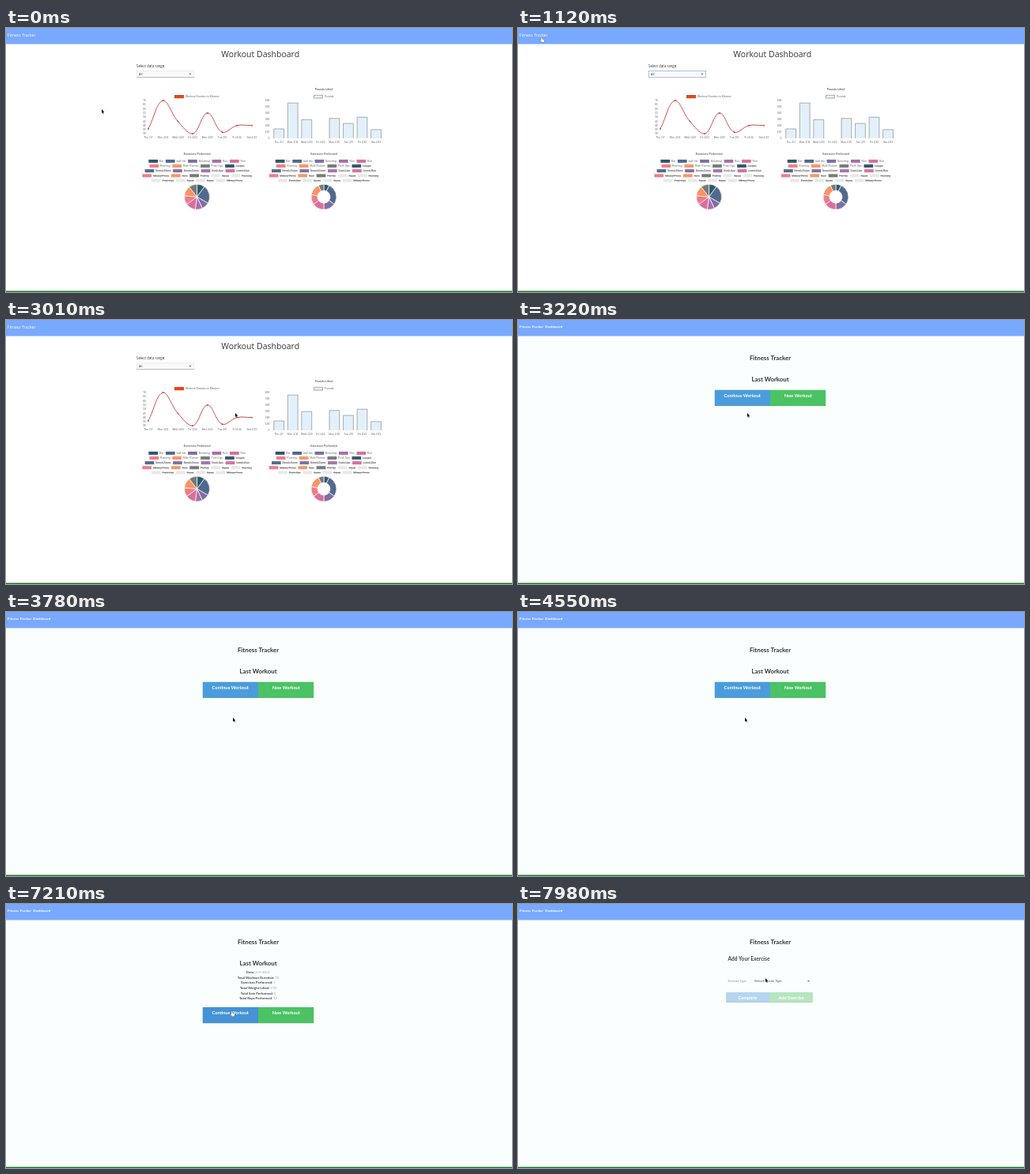
An HTML page with a canvas for the animation above (8000 ms loop, 640 px wide and 335 px high).

```html
<!DOCTYPE html>
<html lang="en">
<head>
<meta charset="utf-8">
<title>Fitness Tracker</title>
<style>
html, body { margin: 0; width: 100%; height: 100%; overflow: hidden; background: #fff; }
canvas { display: block; width: 640px; height: 335px; }
</style>
</head>
<body>
<canvas id="stage" width="640" height="335"></canvas>
<script>
const LOOP = 8000;
const ctx = document.getElementById('stage').getContext('2d');
const OPEN = '"Open Sans", sans-serif';
const LATO = 'Lato, sans-serif';
const ARIAL = '"Liberation Sans", sans-serif';
const GREY = '#666';
const PALETTE = ['#2f5870', '#52698f', '#7f6fa3', '#ab6faa', '#d96f9b', '#f27b85', '#fa9562', '#757b7c'];
const PALE = '#e8e8e8';
const DAYS = ['Thu 1/7', 'Mon 1/11', 'Wed 1/20', 'Fri 1/22', 'Mon 1/25', 'Tue 2/9', 'Fri 2/12', 'Sat 2/13'];

// Exercise names by legend row; "-" marks a hidden (struck out) entry.
const LEGEND = [
  ['Bar', 'wall sits', 'Benching', 'Run', 'Run'],
  ['Running', 'Mule Runner', 'Push Ups', '-Lunges'],
  ['-Bench Press', '-Bench Press', '-Push Ups', '-Lunch Run'],
  ['-Military Press', '-Sum', '-Pull Up', '-Squat', '-Running'],
  ['-Push-Ups', '-Squat', '-Squat', '-Military Press']
];

const STATS = [
  ['Date', '2/9/2021'],
  ['Total Workout Duration', '70'],
  ['Exercises Performed', '1'],
  ['Total Weight Lifted', '170'],
  ['Total Sets Performed', '5'],
  ['Total Reps Performed', '12']
];

// Pointer path: time, x, y of the tip
const PATH = [
  [0, 121, 103], [140, 121, 103], [770, 33, 14], [1120, 29, 12], [1540, 29, 12],
  [2590, 280, 115], [3010, 290, 118], [3640, 290, 118], [3780, 287, 134],
  [5250, 287, 134], [6020, 281, 146], [6230, 280, 145], [6440, 270, 141],
  [6790, 300, 140], [7000, 300, 139], [7420, 270, 134], [7630, 270, 134],
  [7700, 271, 112], [7840, 271, 112], [7980, 313, 94], [8000, 313, 94]
];

function rect(x, y, w, h, color) {
  ctx.fillStyle = color;
  ctx.fillRect(x, y, w, h);
}

function text(str, x, y, size, family, color, align = 'left', weight = 400) {
  ctx.font = `${weight} ${size}px ${family}`;
  ctx.textAlign = align;
  ctx.fillStyle = color;
  ctx.fillText(str, x, y);
}

function label(str, x, y, align = 'center', weight = 400) {
  text(str, x, y + 1.2, 3.4, ARIAL, GREY, align, weight);
}

function frame(bg) {
  rect(0, 0, 640, 335, bg);
  rect(0, 0, 640, 20.4, '#78a9ff');
  rect(0, 333.6, 640, 1.4, '#187a1c');
}

function caret(x, y, color) {
  ctx.fillStyle = color;
  ctx.beginPath();
  ctx.moveTo(x - 1.6, y - 0.8);
  ctx.lineTo(x + 1.6, y - 0.8);
  ctx.lineTo(x, y + 1);
  ctx.fill();
}

// Control points around b for a smooth line through a, b, c
function handles(a, b, c) {
  const d1 = Math.hypot(b[0] - a[0], b[1] - a[1]);
  const d2 = Math.hypot(c[0] - b[0], c[1] - b[1]);
  const k = 0.4 / (d1 + d2 || 1);
  const cap = y => Math.max(92, Math.min(134.3, y));
  const dx = c[0] - a[0], dy = c[1] - a[1];
  return [
    [b[0] - k * d1 * dx, cap(b[1] - k * d1 * dy)],
    [b[0] + k * d2 * dx, cap(b[1] + k * d2 * dy)]
  ];
}

function lineChart() {
  rect(213, 85, 12, 4.2, '#c4472e');
  rect(213.5, 85.5, 11, 3.2, '#f2450f');
  label('Workout Duration in Minutes', 227, 87, 'left');
  for (let i = 0; i < 9; i++) label(70 - 5 * i, 177, 92 + i * 5.28, 'right');

  const pts = [36, 70, 45, 30, 55, 32, 40, 40].map((v, i) => [180 + i * 18.7, 134.3 - (v - 30) * 1.057]);
  const ctl = pts.map((p, i) => handles(pts[i - 1] || p, p, pts[i + 1] || p));
  ctx.strokeStyle = '#c4504c';
  ctx.lineWidth = 1;
  ctx.beginPath();
  ctx.moveTo(...pts[0]);
  for (let i = 1; i < 8; i++) ctx.bezierCurveTo(...ctl[i - 1][1], ...ctl[i][0], ...pts[i]);
  ctx.stroke();
  pts.forEach(([x, y], i) => {
    ctx.fillStyle = '#c4504c';
    ctx.beginPath();
    ctx.arc(x, y, 1, 0, 7);
    ctx.fill();
    label(DAYS[i], x, 139);
  });
}

function barChart() {
  const bar = (x, y, w, h) => {
    rect(x, y, w, h, '#e3f0f9');
    ctx.beginPath();
    ctx.moveTo(x, y + h);
    ctx.lineTo(x, y);
    ctx.lineTo(x + w, y);
    ctx.lineTo(x + w, y + h);
    ctx.strokeStyle = '#858f97';
    ctx.lineWidth = 0.7;
    ctx.stroke();
  };
  label('Pounds Lifted', 402, 77.5, 'center', 700);
  bar(389.5, 85.3, 11, 3.7);
  rect(389.2, 88.7, 11.6, 0.7, '#858f97');
  label('Pounds', 403, 87, 'left');
  for (let i = 0; i < 7; i++) label(600 - 100 * i, 333.5, 92 + i * 8, 'right');
  [150, 560, 298, 0, 316, 237, 335, 138].forEach((v, i) => {
    const x = 345.2 + i * 17.55, h = v * 0.08;
    if (v) bar(x - 6.4, 140 - h, 12.8, h);
    label(DAYS[i], x, 145);
  });
}

function legend(cx) {
  ctx.font = `3.4px ${ARIAL}`;
  let n = 0;
  LEGEND.forEach((row, r) => {
    const items = row.map(name => {
      const str = name.replace(/^-/, '');
      return { str, struck: str !== name, w: ctx.measureText(str).width };
    });
    let x = cx - (items.reduce((sum, it) => sum + it.w + 16.3, -2.8)) / 2;
    const y = 169 + r * 6.12;
    for (const { str, struck, w } of items) {
      rect(x, y - 2, 11.7, 4, n < 16 ? PALETTE[n % 8] : PALE);
      label(str, x + 13.5, y, 'left');
      if (struck) rect(x + 13.5, y - 0.3, w, 0.6, GREY);
      x += w + 16.3;
      n++;
    }
  });
}

// stops: end angle of each slice in degrees, clockwise from the top
function pie(cx, stops, hole) {
  const cy = 214.3, rad = d => (d - 90) * Math.PI / 180;
  label('Exercises Performed', cx, 159.5, 'center', 700);
  legend(cx);
  let from = 0;
  stops.forEach((to, i) => {
    if (to > from) {
      ctx.beginPath();
      ctx.arc(cx, cy, 16, rad(from), rad(to));
      ctx.arc(cx, cy, hole, rad(to), rad(from), true);
      ctx.closePath();
      ctx.fillStyle = PALETTE[i];
      ctx.fill();
      ctx.strokeStyle = '#fff';
      ctx.lineWidth = 0.7;
      ctx.stroke();
    }
    from = to;
  });
}

function dashboard(focused) {
  frame('#fff');
  text('Fitness Tracker', 2, 11.4, 5.15, OPEN, '#fff');
  text('Workout Dashboard', 321.7, 37.3, 10.5, OPEN, '#363636', 'center');
  text('Select data range:', 165, 50.4, 4.4, OPEN, '#333');

  rect(165, 54, 73, 9, focused ? '#8ea9cb' : '#e6e6e6');
  rect(165.7, 54.7, 71.6, 7.6, '#fafafa');
  if (!focused) rect(165, 62, 73, 0.9, '#b4b4b4');
  text('All', 168, 60.2, 3.9, OPEN, '#333');
  caret(233, 58.6, '#666');

  lineChart();
  barChart();
  pie(241.6, [36, 120, 155, 188, 234, 275, 322, 360], 0);
  pie(402, [25, 125, 180, 180, 234, 280, 335, 360], 8);
}

function appFrame() {
  frame('#fafefe');
  text('Fitness Tracker', 2, 9.6, 4.5, LATO, '#fff', 'left', 700);
  text('Dashboard', 34.3, 9.6, 4.5, LATO, '#fff', 'left', 700);
  text('Fitness Tracker', 319, 51, 7.8, LATO, '#303333', 'center', 700);
}

function buttons(x, y, w, h, base, names, colors) {
  ctx.save();
  ctx.beginPath();
  ctx.roundRect(x, y, w * 2, h, 1.3);
  ctx.clip();
  names.forEach((name, i) => {
    rect(x + i * w, y, w, h, colors[i]);
    rect(x + i * w, y + h - 0.7, w, 0.7, 'rgba(0,0,0,.1)');
    text(name, x + (i + 0.5) * w, base, 5.6, LATO, '#fff', 'center', 700);
  });
  ctx.restore();
}

function lastWorkout(loaded) {
  appFrame();
  text('Last Workout', 319, 77.7, 7.8, LATO, '#303333', 'center', 700);
  if (loaded) {
    STATS.forEach(([name, value], i) => {
      const y = 88 + i * 6.65, head = name + ': ';
      ctx.font = `700 4.3px ${LATO}`;
      const w = ctx.measureText(head).width;
      const x = 319 - (w + ctx.measureText(value).width) / 2;
      text(head, x, y, 4.3, LATO, '#3c4040', 'left', 700);
      text(value, x + w, y, 4.3, LATO, '#999e9e', 'left', 400);
    });
  }
  const y = loaded ? 130.7 : 88.5;
  buttons(248.5, y, 70.5, 20.8, y + 9.5, ['Continue Workout', 'New Workout'],
    [loaded ? '#4592d5' : '#4b9cdc', '#4bc264']);
}

function addExercise() {
  appFrame();
  text('Add Your Exercise', 265.5, 72, 6.6, LATO, '#404444', 'left', 700);
  text('Exercise Type', 265.5, 98.9, 3.9, LATO, '#8b9090');
  text('Select Exercise Type', 299, 98.9, 3.9, LATO, '#444848');
  caret(367.5, 97.7, '#777');
  buttons(263, 112, 55, 13, 120.6, ['Complete', 'Add Exercise'], ['#b6d5f1', '#b6e5c0']);
}

function pointer(t, hand) {
  const i = PATH.findIndex(p => p[0] > t);
  const [t0, x0, y0] = PATH[i - 1], [t1, x1, y1] = PATH[i];
  const k = (t - t0) / (t1 - t0), e = k * k * (3 - 2 * k);
  ctx.save();
  ctx.translate(x0 + (x1 - x0) * e, y0 + (y1 - y0) * e);
  const shape = new Path2D(hand
    ? 'M.3.3Q1-.3 1.5.5V2.2L4 2.7Q4.6 3 4.4 4L3.8 6H1L-.8 3.6Q-.9 2.7.2 3.4Z'
    : 'M0 0V5L1.1 4L1.9 5.9L2.7 5.5L1.9 3.7H3.4Z');
  ctx.lineWidth = hand ? 0.6 : 0.5;
  ctx.strokeStyle = hand ? '#333' : '#fff';
  ctx.fillStyle = hand ? '#fff' : '#000';
  ctx.stroke(shape);
  ctx.fill(shape);
  ctx.restore();
}

function draw(now) {
  const t = now % LOOP;
  const loaded = (t >= 4270 && t < 4550) || t >= 5320;
  if (t < 3220) dashboard(t >= 1120 && t < 1400);
  else if (t < 7700) lastWorkout(loaded);
  else addExercise();
  pointer(t, (t >= 770 && t < 1680) || (loaded && t < 7700));
  requestAnimationFrame(draw);
}

const start = performance.now();
requestAnimationFrame(function first() {
  const tick = draw;
  draw = () => tick(performance.now() - start);
  draw();
});
</script>
</body>
</html>
```
